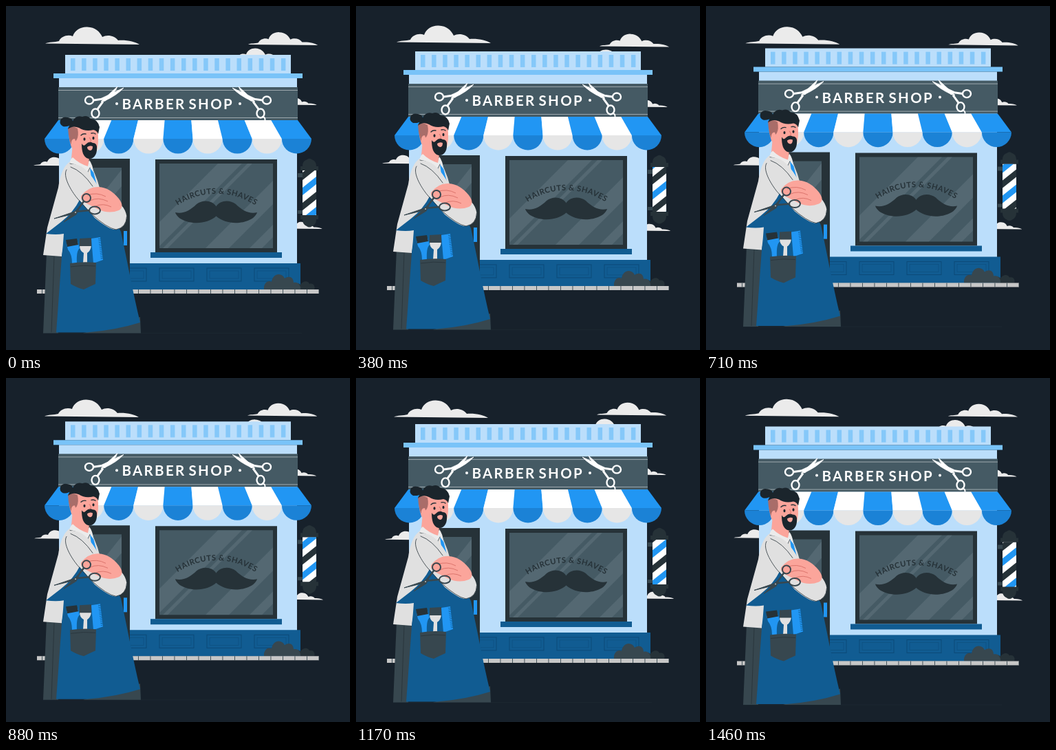
Animation, 500 px wide and 500 px high, one loop 1500 ms. Source, as an HTML page:

```html
<!DOCTYPE html>
<html lang="en">
<head>
<meta charset="utf-8">
<title>Barber shop</title>
<style>
  html, body { margin: 0; width: 100%; height: 100%; overflow: hidden; background: #17212b; }
  svg { display: block; width: 100%; height: 100%; }
  text { font-family: Lato, sans-serif; font-weight: 700; }
  .line { fill: none; stroke: #263238; stroke-linecap: round; stroke-linejoin: round; }
</style>
</head>
<body>
<svg viewBox="0 0 500 500">
  <defs>
    <path id="cloud" d="M57 54.500C62 52 71 53 77 51C80 44 90 41 97 44C100 35 109 30 118 30.500C130 31 136 37 140 45C147 41 158 43 163 50C175 49 188 52 194 56Z"/>
    <g id="scissors" fill="none" stroke="#fff" stroke-width="2.400">
      <ellipse cx="121" cy="137" rx="6" ry="5.500"/>
      <ellipse cx="130" cy="156" rx="5.500" ry="6.500"/>
      <path d="M127 137L141 135M133 150L141 139" stroke-width="3"/>
      <path d="M139 134L171 119Q161 130 143 138ZM138 139L162 117Q158 128 144 138Z" fill="#fff" stroke-width=".8"/>
    </g>
    <path id="whisker" d="M306 292C300 282 286 281 277 288C268 297 257 303 246 300C251 316 288 322 306 305Z"/>
    <path id="arc" d="M245 293A102 102 0 0 1 367 293"/>
    <clipPath id="glass"><path d="M223 229h165v123h-165z"/></clipPath>
    <clipPath id="tube"><path d="M431 239h20v66h-20z"/></clipPath>
  </defs>

  <rect width="500" height="500" fill="#17212b"/>
  <g id="clouds" fill="#ebebeb"></g>

  <g id="scene">
    <path d="M54 475.500H430" stroke="#1e2a33" stroke-width=".8"/>

    <!-- shop front -->
    <path d="M77 105H423V412H77Z" fill="#bbdefb"/>
    <path d="M86 71H414V98H86Z" fill="#bbdefb"/>
    <g id="slats" fill="#85c8f9"></g>
    <path d="M69 98H431V105H69Z" fill="#79c3f8"/>
    <path d="M76 118H424V166H76Z" fill="#455a64"/>
    <path d="M76 122.500H424M76 162.500H424" stroke="#c4cccf" stroke-width=".7"/>
    <g fill="#fff" font-size="20.500" letter-spacing="2.300">
      <text x="168.500" y="150">BARBER</text>
      <text x="265.500" y="150">SHOP</text>
      <circle cx="161" cy="142" r="2"/>
      <circle cx="340" cy="142" r="2"/>
    </g>
    <use href="#scissors"/>
    <use href="#scissors" transform="matrix(-1 0 0 1 500 0)"/>
    <path d="M372 161Q377 161 376.500 166" fill="none" stroke="#fff" stroke-width="2"/>

    <path d="M77 374H428V412H77Z" fill="#115c92"/>
    <g id="panels" fill="none" stroke="#0c4a78"></g>

    <!-- door -->
    <path d="M100 222H180V412H100Z" fill="#263238"/>
    <path d="M106 235H168V322H106Z" fill="#455a64"/>
    <path d="M168 238V262L138 297H121Z" fill="#546872"/>
    <rect x="171" y="327" width="5" height="21" fill="#2196f3"/>

    <!-- window -->
    <path d="M217 223H394V358H217Z" fill="#263238"/>
    <path d="M223 229H388V352H223Z" fill="#455a64"/>
    <path clip-path="url(#glass)" fill="#546872" d="M308 229H343L223 349V314ZM351 229H358L235 352H228ZM388 254V288L324 352H290ZM388 318V336L372 352H354Z"/>
    <path d="M210 358H401V366H210Z" fill="#115c92"/>
    <g fill="#263238">
      <text font-size="11.200" letter-spacing=".5" text-anchor="middle"><textPath href="#arc" startOffset="50%">HAIRCUTS &amp; SHAVES</textPath></text>
      <use href="#whisker"/>
      <use href="#whisker" transform="matrix(-1 0 0 1 611 0)"/>
    </g>

    <g id="awning"></g>

    <!-- pavement and bush -->
    <path d="M418 412C417 404 424 401 428 405C432 399 439 399 441 404C447 402 450 408 448 412Z" fill="#263238"/>
    <path d="M375 412C374 403 381 398 386 401C388 388 401 387 405 396C412 391 418 395 418 402C425 400 429 407 428 412Z" fill="#37474f"/>
    <path d="M45 412H455V418H45Z" fill="#c7c7c7"/>
    <path d="M52 415H455" stroke="#37474f" stroke-width="6" stroke-dasharray=".9 16.600"/>

    <!-- pole -->
    <path d="M424 243H432V249H424ZM424 297H432V302H424Z" fill="#37474f"/>
    <path d="M431 239H451V305H431Z" fill="#fff"/>
    <g clip-path="url(#tube)"><g id="stripes"></g></g>
    <path d="M428 239V233H431C431 226 435 224 437 223.500Q441 220 445 223.500C447 224 451 226 451 233H454V239ZM428 304H454V310H451C451 317 447 319 445 320Q441 323 437 320C435 319 431 317 431 310H428Z" fill="#263238"/>

    <!-- barber: legs, shirt and apron -->
    <path d="M59 358H84L76 475.500H54ZM112 475.500L195 452L196 475.500Z" fill="#37474f"/>
    <path class="line" d="M70 364L66 474" stroke-width=".8"/>
    <path d="M97 224C86 229 80 240 76 264L60 322L54 362L81 364L86 330L150 312L133 254L122 226Z" fill="#e0e0e0"/>
    <path d="M121 228L125 233L133 264H126Z" fill="#2196f3"/>
    <path d="M108 280Q98 300 80 314L58 331Q73 333 84 331Q83 348 81 364L73 474.500H118Q160 471 195 460C184 414 177 374 167 328L150 296Z" fill="#115c92"/>

    <!-- pocket and tools -->
    <path d="M88 346L104 342L107 352Q102 356 103 374H96Q96 361 90 354Z" fill="#2196f3"/>
    <path d="M87 340L103 338L105 347L89 350Z" fill="#263238"/>
    <path d="M107 348H124Q123 356 118 359V374H112L113 359Q107 356 107 348Z" fill="#e0e0e0"/>
    <path d="M107 338L124 337V349H107Z" fill="#37474f"/>
    <path d="M124 338L137 336L141 369L127 374Z" fill="#2196f3"/>
    <path d="M136 338L140 368" stroke="#115c92" stroke-width="4" stroke-dasharray=".8 1.800"/>
    <path d="M93 374Q112 371 131 373L130 404Q121 408 113 412Q102 409 94 404Z" fill="#37474f"/>
    <path d="M94 379Q113 376 130 378" fill="none" stroke="#263238" stroke-width=".7"/>

    <!-- neck and head -->
    <path d="M97 200L95 222Q105 232 120 237L121 214Z" fill="#fba59b"/>
    <path d="M97 220Q92 224 93 229Q108 231 118 243L122 235L127 242Q126 230 121 224L119 233Q106 229 97 220Z" fill="#ebebeb"/>
    <path class="line" d="M93 229Q108 231 118 243L122 235" stroke-width=".7"/>
    <path d="M92 177Q112 166 133 180Q136 200 131 211Q124 223 112 218Q101 213 95 205Q90 190 92 177Z" fill="#fba59b"/>
    <path d="M90 177Q96 173 104 178Q106 188 103 194L96 203Q91 196 90 177Z" fill="#a96d69"/>
    <path d="M100 193Q94 193 95 202Q98 209 104 206Z" fill="#fba59b"/>
    <path d="M110 200Q113 205 116 201Q121 196 126 199Q131 199 132 204C133 214 129 223 120 222C112 220 110 211 110 200Z" fill="#1b252c"/>
    <path d="M118 205Q122 202 126 204Q126 210 122 210Q118 209 118 205Z" fill="#fba59b"/>
    <path d="M90 179Q92 172 96 171Q91 176 83 175Q77 172 79 166Q82 160 90 162Q96 163 97 167Q102 158 111 161Q118 158 123 164Q133 164 136 176L134 186Q132 181 127 180Q115 183 106 177Q97 173 90 179Z" fill="#1b252c"/>
    <g fill="#1b252c"><ellipse cx="114" cy="193.500" rx="1.500" ry="2.200"/><ellipse cx="127" cy="192" rx="1.500" ry="2.200"/></g>
    <path class="line" d="M109 188Q112 185 116 186M124 185Q128 184 130 186" stroke-width="1.400"/>
    <path d="M121 191Q126 197 121 198" fill="none" stroke="#d97068"/>

    <!-- arms and held scissors -->
    <path d="M88 232C80 242 88 259 98 272L129 308Q151 326 160 325Q175 322 175.500 306Q174 296 167 289L137 268Q123 241 109 233Q96 227 88 232Z" fill="#e0e0e0"/>
    <path class="line" d="M88 238C82 247 94 268 104 280L124 302Q147 323 160 325Q175 322 175.500 306M94 234Q111 240 126 262" stroke-width=".8"/>
    <path d="M109 276Q120 262 135 263Q151 264 164 280Q173 292 164 297Q149 303 133 295L119 288Q107 282 109 276Z" fill="#fba59b"/>
    <path d="M118 275Q132 270 145 277M122 283Q134 277 148 284M130 291Q141 286 153 292" fill="none" stroke="#d97068" stroke-width=".9"/>
    <g class="line" style="stroke:#37474f">
      <ellipse cx="117" cy="279" rx="6" ry="6" stroke-width="2"/>
      <ellipse cx="129" cy="297" rx="8" ry="5.500" stroke-width="2"/>
      <path d="M113 284L102 299M121 297L100 299" stroke-width="2.500"/>
      <path d="M105 297L70 309L95 303ZM106 293L84 314L102 303Z" fill="#37474f" stroke-width="1"/>
    </g>
    <circle cx="101" cy="300" r="1" fill="#bbb"/>
  </g>
</svg>
<script>
  const LOOP = 1500, PEAK = 725, RISE = 9.6;
  const byId = id => document.getElementById(id);
  const repeat = (id, count, shape) => {
    byId(id).innerHTML = Array.from({ length: count }, (_, i) => shape(i)).join('');
  };

  repeat('slats', 20, i => `<rect x="${94 + i * 16.1}" y="76" width="6.500" height="18"/>`);
  repeat('panels', 4, i => `<rect x="${154 + i * 69}" y="381" width="50" height="19"/>
    <rect x="${158 + i * 69}" y="385" width="42" height="11" stroke-width=".5"/>`);

  repeat('awning', 9, i => {
    const top = 76 + i * 38.67, low = 56 + i * 43.11, blue = i % 2 === 0;
    return `<path d="M${top} 166h38.67L${low + 43.11} 193H${low}Z" fill="${blue ? '#2196f3' : '#fff'}"/>
      <path d="M${low} 193h43.11a21.555 21.555 0 0 1-43.11 0Z" fill="${blue ? '#1b82d6' : '#e6e6e6'}"/>`;
  });

  const BAND = 44;
  repeat('stripes', 8, i => `<path d="M431 ${176 + i * BAND / 2}l20 -16v11l-20 16Z"
    fill="${i % 2 ? '#263238' : '#2196f3'}"/>`);

  // x, y, scale, horizontal drift, vertical drift
  const clouds = [
    [57, 56, 1, 2, -2], [352, 57, .74, 2, 2.5], [40, 232.5, .5, -2, -3],
    [397, 144, .4, 1, 3], [405, 324, .4, -2.5, 3], [323, 78, .65, 1, 2]
  ];
  repeat('clouds', clouds.length, () => '<use href="#cloud"/>');
  const cloudNodes = [...byId('clouds').children];

  function draw(now) {
    const t = now % LOOP;
    const lift = t < PEAK ? t / PEAK : (LOOP - t) / (LOOP - PEAK);
    byId('scene').setAttribute('transform', `translate(0 ${-RISE * lift})`);
    byId('stripes').setAttribute('transform', `translate(0 ${BAND * t / LOOP})`);
    const sway = Math.sin(2 * Math.PI * t / LOOP);
    clouds.forEach(([x, y, scale, dx, dy], i) => cloudNodes[i].setAttribute('transform',
      `translate(${x + dx * sway} ${y + dy * sway}) scale(${scale}) translate(-57 -56)`));
  }

  const start = performance.now();
  function tick() {
    draw(performance.now() - start);
    requestAnimationFrame(tick);
  }
  tick();
</script>
</body>
</html>
```
